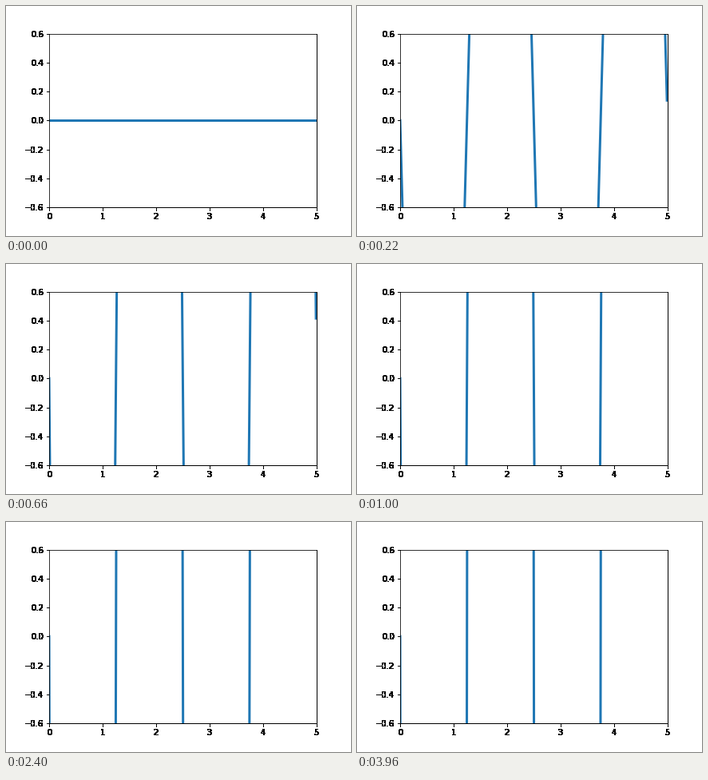
Recreate the animation shown at these times as a matplotlib script. Size 432x288 px, loop 4 s.

```python
import matplotlib.pyplot as plt
import numpy as np
from matplotlib.animation import FuncAnimation

FRAMES, INTERVAL = 200, 20
PERIOD = 2.5
GROWTH = 0.5  # amplitude gained per frame


def harden(img, dpi):
    """Turn every touched pixel solid black, for crisp unsmoothed labels."""
    out = np.zeros_like(img)
    out[..., 3] = img[..., 3] > 0
    return out, 0, 0


fig, ax = plt.subplots(figsize=(6, 4), dpi=72, facecolor="white")
fig.subplots_adjust(left=0.125, right=0.9, bottom=0.125, top=0.88)
ax.set(xlim=(0, 5), ylim=(-0.6, 0.6))
for axis in (ax.xaxis, ax.yaxis):
    axis.set_agg_filter(harden)
for side in ("right", "bottom"):
    ax.spines[side].set_linewidth(1)

x = np.arange(0, 5, 0.01)
wave = -np.sin(2 * np.pi * x / PERIOD)
line, = ax.plot(x, 0 * x, lw=3, color="C0")


def update(i):
    line.set_data(x, GROWTH * i * wave)
    return line,


anim = FuncAnimation(fig, update, frames=FRAMES, interval=INTERVAL,
                     init_func=lambda: update(0), repeat=True,
                     repeat_delay=0, blit=False)
plt.show()
```
